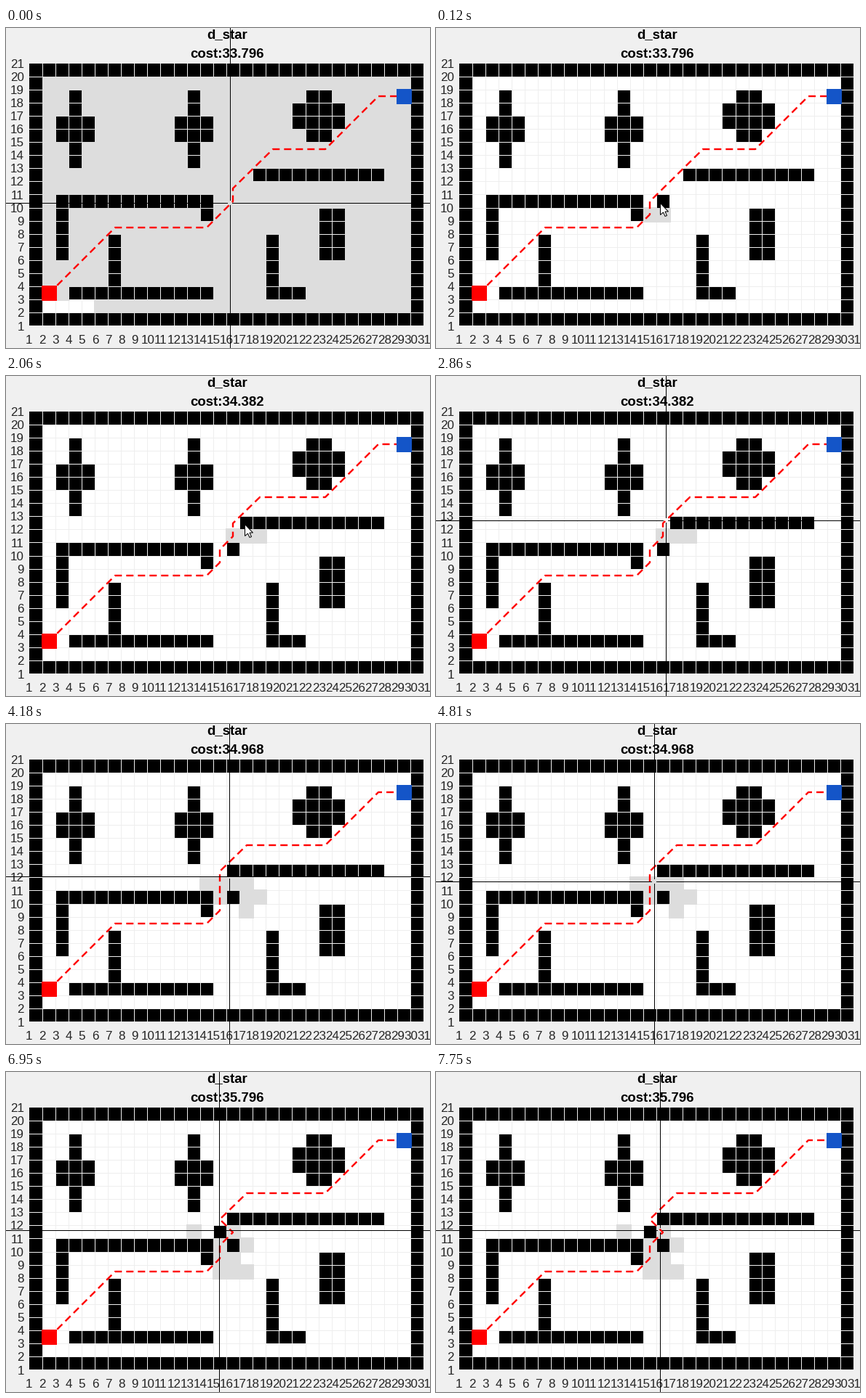
Animation of 583x441 px, one loop 8 s. Source, as a matplotlib script:

```python
import math

import matplotlib.pyplot as plt
from matplotlib.animation import FuncAnimation
from matplotlib.collections import PolyCollection
from matplotlib.patches import Circle, Polygon

W, H, DPI = 583, 441, 100
LOOP, STEP = 8000, 20
LEFT, BOTTOM, CELL = 31.95, 410.95, 18.1
COLS, ROWS = 30, 20
LINE = 2.4


def px(x):
    return LEFT + CELL * (x - 1)


def py(y):
    return BOTTOM - CELL * (y - 1)


def col_x(c):
    return math.floor(px(c))


def row_y(r):
    return math.floor(py(r))


def box(x0, y0, x1, y1):
    return [(x0, y0), (x1, y0), (x1, y1), (x0, y1)]


def cell_box(c, r):
    """Inside of a grid cell, between its grid lines."""
    return box(col_x(c) + 1, row_y(r + 1) + 1, col_x(c + 1), row_y(r))


def marker_box(c, r, size=21):
    x = round(px(c + .5) - size / 2)
    y = round(py(r + .5) - size / 2)
    return box(x, y, x + size, y + size)


def block(c0, c1, r0, r1):
    return {(c, r) for c in range(c0, c1 + 1) for r in range(r0, r1 + 1)}


border = (block(1, COLS, 1, 1) | block(1, COLS, ROWS, ROWS)
          | block(1, 1, 1, ROWS) | block(COLS, COLS, 1, ROWS))
crosses = (block(4, 4, 13, 18) | block(3, 5, 15, 16)
           | block(13, 13, 13, 18) | block(12, 14, 15, 16))
diamond = block(22, 23, 15, 18) | block(21, 24, 16, 17)
bars = (block(18, 27, 12, 12) | block(3, 14, 10, 10) | block(3, 3, 6, 10)
        | block(14, 14, 9, 9) | block(7, 7, 4, 7) | block(4, 14, 3, 3)
        | block(19, 19, 3, 7) | block(19, 21, 3, 3) | block(23, 24, 6, 9))
walls = border | crosses | diamond | bars
free = block(1, COLS, 1, ROWS) - walls

HEAD = [(2, 3), (7, 8), (14, 8)]
TAIL = [(23, 14), (27, 18), (29, 18)]

# start time, cost, added walls, revisited cells, middle of the route
STAGES = [
    (0, "33.796", [], free - block(2, 5, 2, 2),
     [(16, 10), (16, 11), (19, 14)]),
    (120, "33.796", [(16, 10)], block(15, 16, 9, 9),
     [(15, 9), (15, 10), (19, 14)]),
    (2060, "34.382", [(16, 10), (17, 12)], block(16, 18, 11, 11),
     [(15, 9), (15, 10), (16, 11), (16, 12), (18, 14)]),
    (3670, "34.968", [(16, 10), (17, 12), (16, 12)],
     block(14, 17, 11, 11) | block(15, 18, 10, 10) | {(17, 9)},
     [(15, 9), (15, 12), (17, 14)]),
    (6350, "35.796", [(16, 10), (17, 12), (16, 12), (15, 11)],
     block(15, 17, 8, 8) | block(15, 16, 9, 9) | block(15, 17, 10, 10)
     | {(13, 11), (16, 11)},
     [(15, 9), (15, 10), (16, 11), (15, 12), (17, 14)]),
]

# time, pointer kind, position: cross, press (cross with ring), arrow, none
POINTER = [
    (0, "cross", 308, 241), (120, "arrow", 308, 241), (320, "none", 0, 0),
    (620, "cross", 309, 239), (730, "cross", 312, 233),
    (840, "cross", 315, 226), (1040, "cross", 319, 219),
    (1140, "cross", 322, 213), (1350, "cross", 324, 209),
    (1450, "cross", 326, 207), (1550, "cross", 327, 205),
    (1860, "cross", 329, 206), (1960, "cross", 328, 204),
    (2060, "arrow", 328, 204), (2250, "none", 0, 0),
    (2660, "cross", 326, 203), (2760, "cross", 320, 201),
    (2860, "cross", 316, 199), (3370, "press", 316, 199),
    (3470, "cross", 316, 199), (3670, "arrow", 316, 199),
    (3780, "cross", 313, 203), (4180, "cross", 307, 210),
    (4270, "cross", 306, 212), (4490, "cross", 304, 214),
    (4590, "cross", 303, 217), (4810, "cross", 300, 217),
    (4910, "cross", 297, 217), (5010, "cross", 294, 217),
    (5210, "cross", 292, 220), (5620, "cross", 292, 217),
    (6030, "press", 292, 217), (6230, "cross", 292, 217),
    (6350, "arrow", 292, 217), (6540, "none", 0, 0),
    (6950, "cross", 293, 218), (7050, "cross", 296, 219),
    (7150, "cross", 300, 221), (7350, "cross", 305, 221),
    (7440, "cross", 308, 220), (7650, "cross", 308, 216),
    (7750, "cross", 308, 218),
]

ARROW = [(0, 0), (0, 16), (4, 12.5), (6.5, 18), (9, 17), (6.5, 11.5), (11, 11.5)]

fig = plt.figure(figsize=(W / DPI, H / DPI), dpi=DPI, facecolor="#f0f0f0")
ax = fig.add_axes([0, 0, 1, 1])
ax.set_xlim(0, W)
ax.set_ylim(H, 0)
ax.axis("off")


def pt(pixels):
    return pixels * 72 / DPI


def fill(verts, color, z):
    coll = PolyCollection(verts, facecolors=color, edgecolors="none",
                          linewidths=0, antialiaseds=False, zorder=z)
    ax.add_collection(coll, autolim=False)
    return coll


def label(x, y, text, size, **kw):
    return ax.text(x, y, text, fontsize=pt(size),
                   family="Liberation Sans", va="baseline", **kw)


x0, x1 = col_x(1), col_x(COLS + 1) + 1
y0, y1 = row_y(ROWS + 1), row_y(1) + 1
fill([box(x0, y0, x1, y1)], "white", 0)
grid = [box(col_x(c), y0, col_x(c) + 1, y1) for c in range(1, COLS + 2)]
grid += [box(x0, row_y(r), x1, row_y(r) + 1) for r in range(1, ROWS + 2)]
fill(grid, "#eeeeee", 1)

for c in range(1, COLS + 2):
    label(px(c), 435, str(c), 17, ha="center", color="#262626")
for r in range(1, ROWS + 2):
    label(25, py(r) + 5.6, str(r), 17, ha="right", color="#262626")
label(304, 14.5, "d_star", 18.7, ha="center", weight="bold")
cost = label(304, 41, "", 18.7, ha="center", weight="bold")

visited = fill([], "#dddddd", 2)
wall_cells = fill([], "black", 3)
route, = ax.plot([], [], color="red", lw=pt(LINE), zorder=5,
                 dash_capstyle="butt", solid_joinstyle="miter")
route.set_dashes([10 / LINE, 6 / LINE])
fill([marker_box(2, 3)], "red", 6)
fill([marker_box(29, 18)], "#1455c8", 6)

cross = fill([], "black", 8)
ring = ax.add_patch(Circle((0, 0), 14, fill=False, ec="black",
                           lw=pt(1), zorder=9))
arrow = ax.add_patch(Polygon(ARROW, fc="white", ec="black",
                             lw=pt(1), zorder=9))


def hairs(x, y, gap=3):
    return [box(0, y, x - gap, y + 1), box(x + gap, y, W, y + 1),
            box(x, 0, x + 1, y - gap), box(x, y + gap, x + 1, H)]


def latest(events, t):
    return [e for e in events if e[0] <= t][-1]


def draw(i):
    t = i * STEP + STEP // 2
    _, value, added, seen, middle = latest(STAGES, t)
    cost.set_text("cost:" + value)
    visited.set_verts([marker_box(c, r) for c, r in sorted(seen)])
    wall_cells.set_verts([cell_box(c, r) for c, r in sorted(walls | set(added))])
    nodes = HEAD + middle + TAIL
    route.set_data([round(px(c + .5)) for c, _ in nodes],
                   [round(py(r + .5)) for _, r in nodes])

    _, kind, x, y = latest(POINTER, t)
    cross.set_verts(hairs(x, y) if kind in ("cross", "press") else [])
    ring.set_visible(kind == "press")
    ring.center = x, y
    arrow.set_visible(kind == "arrow")
    arrow.set_xy([(x + .5 + dx, y + .5 + dy) for dx, dy in ARROW])
    return cost, visited, wall_cells, route, cross, ring, arrow


anim = FuncAnimation(fig, draw, frames=LOOP // STEP, interval=STEP,
                     repeat=True, repeat_delay=0)
plt.show()
```
